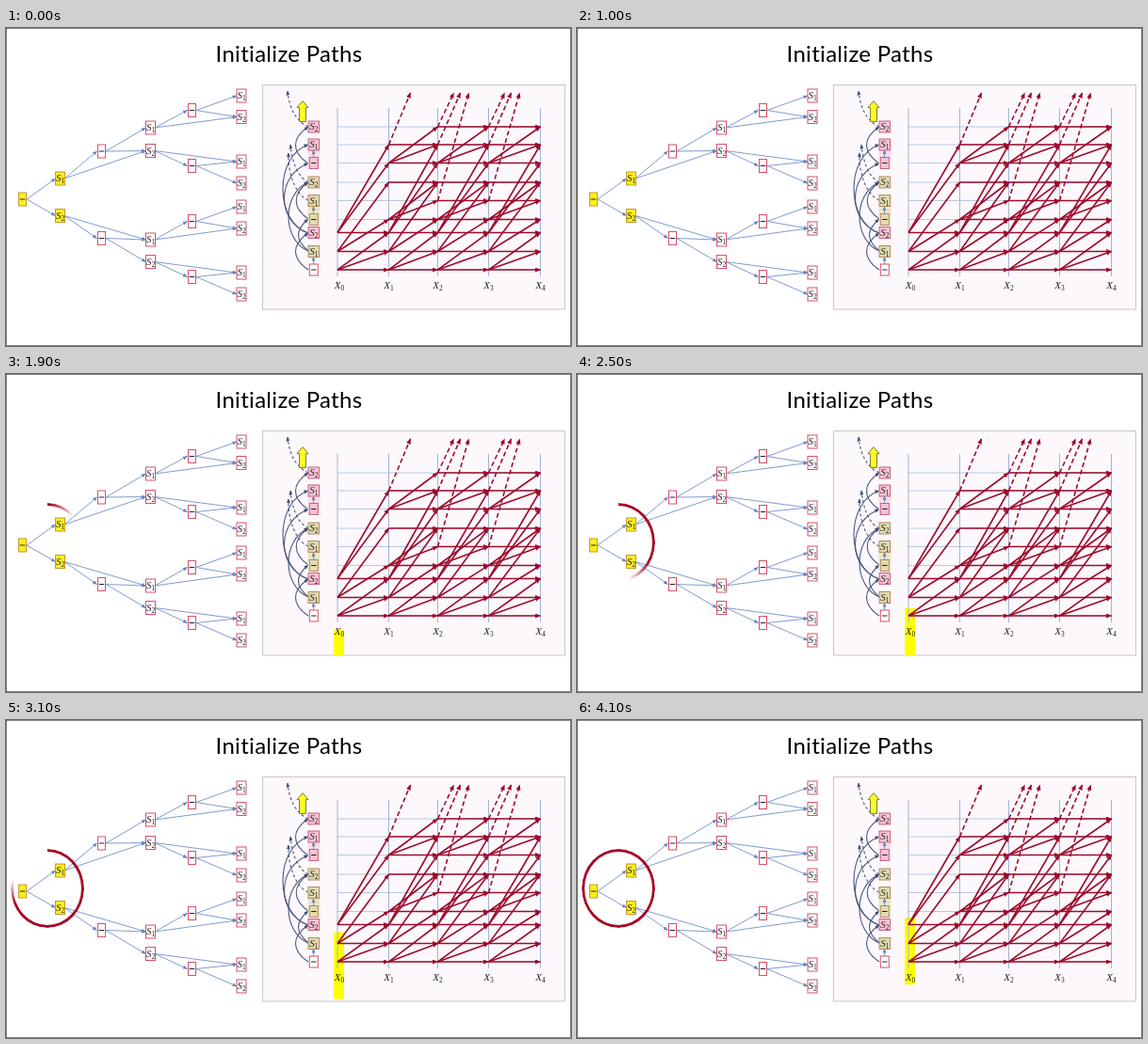
Recreate the animation shown at these times as an HTML page. Size 600 px wide and 338 px high, loop 4200 ms.

```html
<!DOCTYPE html>
<html lang="en">
<head>
<meta charset="utf-8">
<title>Initialize Paths</title>
<style>
  html, body { margin: 0; width: 100%; height: 100%; overflow: hidden; background: #fff; }
  #stage { position: relative; width: 600px; height: 338px; overflow: hidden; }
  svg { display: block; }
  .title { font: 24px Lato, sans-serif; letter-spacing: .3px; text-anchor: middle; }
  .sym { font: italic 11px "Liberation Serif", serif; text-anchor: middle; fill: #222; }
  .sub { font-size: 7.5px; font-style: normal; }
  #ring {
    position: absolute; left: 5px; top: 136.5px; width: 78px; height: 84px;
    box-sizing: border-box; border: 3px solid #a50a28; border-radius: 50%;
  }
</style>
</head>
<body>
<div id="stage">
  <svg id="art" width="600" height="338" viewBox="0 0 600 338">
    <defs>
      <marker id="blue" markerUnits="userSpaceOnUse" markerWidth="5" markerHeight="4" refX="4.5" refY="2" orient="auto">
        <path d="M0 0L5 2L0 4z" fill="#6686c2"/>
      </marker>
      <marker id="red" markerUnits="userSpaceOnUse" markerWidth="6" markerHeight="5" refX="5.5" refY="2.5" orient="auto">
        <path d="M0 0L6 2.5L0 5z" fill="#9c0c2c"/>
      </marker>
      <marker id="navy" markerUnits="userSpaceOnUse" markerWidth="5" markerHeight="4" refX="4.5" refY="2" orient="auto">
        <path d="M0 0L5 2L0 4z" fill="#3d4a70"/>
      </marker>
      <clipPath id="panelClip"><rect x="272" y="61" width="322" height="238"/></clipPath>
    </defs>
    <text class="title" x="300.5" y="36">Initialize Paths</text>
    <rect x="272.5" y="60.5" width="321" height="238.5" fill="#fcf8fc" stroke="#c9c4cd"/>
    <g clip-path="url(#panelClip)"><rect id="bar" x="348" width="11" height="71" y="300" fill="#ff0"/></g>
  </svg>
  <div id="ring"></div>
</div>
<script>
const art = document.getElementById('art');
const bar = document.getElementById('bar');
const ring = document.getElementById('ring');

function add(tag, attrs, parent = art) {
  const el = document.createElementNS('http://www.w3.org/2000/svg', tag);
  for (const k in attrs) el.setAttribute(k, attrs[k]);
  parent.appendChild(el);
  return el;
}

function path(d, stroke, width, extra = {}) {
  add('path', { d, stroke, 'stroke-width': width, fill: 'none', ...extra });
}

function arrow(x1, y1, x2, y2, kind, extra = {}) {
  const [stroke, width] = kind === 'red' ? ['#9c0c2c', 1.6] : ['#7f9bd0', 1];
  path(`M${x1} ${y1}L${x2} ${y2}`, stroke, width, { 'marker-end': `url(#${kind})`, ...extra });
}

// "S1" becomes S with a lowered digit; "-" becomes a short bar
function symbol(x, y, name) {
  if (name === '-') return path(`M${x - 2.7} ${y}h5.4`, '#222', 1);
  const t = add('text', { class: 'sym', x, y: y + 3.2 });
  t.textContent = name[0];
  const s = add('tspan', { class: 'sub', dy: 2 }, t);
  s.textContent = name[1];
}

function box(x, y, w, h, name, fill, stroke) {
  add('rect', { x: x - w / 2, y: y - h / 2, width: w, height: h, fill, stroke });
  symbol(x, y, name);
}

// Prefix tree
const nodes = [
  [17.5, 182, '-'], [57.5, 160, 'S1'], [57.5, 199.5, 'S2'],
  [101.5, 131, '-'], [101.5, 223.5, '-'],
  [153.5, 106, 'S1'], [153.5, 130.5, 'S2'], [153.5, 225, 'S1'], [153.5, 248.5, 'S2'],
  [197.5, 87.5, '-'], [197.5, 146.5, '-'], [197.5, 205.5, '-'], [197.5, 264.5, '-'],
  [250, 72, 'S1'], [250, 94.5, 'S2'], [250, 142, 'S1'], [250, 165, 'S2'],
  [250, 190, 'S1'], [250, 213, 'S2'], [250, 260, 'S1'], [250, 283, 'S2']
];
const children = [
  [1, 2], [3, 6], [4, 7], [5, 6], [7, 8], [9, 14], [10, 15], [11, 18], [12, 19],
  [13, 14], [15, 16], [17, 18], [19, 20]
];
children.forEach((list, i) => list.forEach(j => {
  const [x1, y1] = nodes[i], [x2, y2] = nodes[j];
  arrow(x1 + 4.5, y1, x2 - 5, y2, 'blue');
}));
nodes.forEach(([x, y, name], i) =>
  box(x, y, name === '-' ? 8 : 10, 14, name, i < 3 ? '#ffee1c' : '#fff', i < 3 ? '#c29a2c' : '#d5506c'));

// Trellis grid
const cols = [352, 406.5, 458.5, 512.5, 567.5];
const rows = [257, 237.5, 217.5, 203.5, 183.5, 164, 143.5, 124, 105];
rows.forEach(y => path(`M352 ${y}H567.5`, '#b9c8e4', 1));
cols.forEach(x => path(`M${x} 85V264`, '#a3b3d3', 1));

// Each state keeps itself or moves to its successors
const next = [[1, 2], [3, 5], [6, 7], [4, 5], [], [], [7, 8], [], []];
let live = new Set([0, 1, 2]);
for (let c = 0; c < 4; c++) {
  const reached = new Set(live);
  for (const s of live) {
    for (const n of [s, ...next[s]]) {
      arrow(cols[c], rows[s], cols[c + 1], rows[n], 'red');
      reached.add(n);
    }
  }
  live = reached;
}
const dashed = { 'stroke-dasharray': '5 3' };
arrow(406.5, 124, 429.5, 69, 'red', dashed);
for (const x of [458.5, 512.5]) {
  arrow(x, 105, x + 17, 69, 'red', dashed);
  arrow(x, 124, x + 24, 69, 'red', dashed);
  arrow(x, 183.5, x + 33, 69, 'red', dashed);
}
cols.forEach((x, i) => symbol(x + (i ? 0 : 2), 273.5, 'X' + i));

// State column with its curved transitions
const bend = (y1, y2, x) =>
  path(`M321 ${y1}C${x} ${y1 - 12} ${x} ${y2 + 12} 321 ${y2}`, '#4b587e', 1.1, { 'marker-end': 'url(#navy)' });
[[257, 218, 303], [237, 203, 307], [237, 164, 293], [218, 144, 287], [218, 124, 285],
 [203, 164, 304], [144, 105, 303]].forEach(b => bend(...b));
const loose = { 'stroke-dasharray': '3 2.5', 'marker-end': 'url(#navy)' };
path('M321 105C308 99 301 86 299 67', '#4b587e', 1.1, loose);
path('M321 164C309 158 304 142 302 124', '#4b587e', 1.1, loose);
path('M321 183C308 178 299 155 300 133', '#4b587e', 1.1, loose);

add('rect', { x: 320.5, y: 118, width: 13, height: 32, fill: '#fbdde8' });
add('rect', { x: 320.5, y: 177, width: 13, height: 32, fill: '#ebe6c8' });
for (const y of [143.5, 203.5, 257]) arrow(326.5, y - 6, 326.5, y - 14, 'blue');
const pink = ['#f8c3d6', '#c4657f'], tan = ['#e0dbb0', '#b58a62'];
const looks = [['#fff', '#d5506c'], tan, pink, tan, tan, tan, pink, pink, pink];
['-', 'S1', 'S2', '-', 'S1', 'S2', '-', 'S1', 'S2'].forEach((name, i) =>
  box(326.8, rows[i], name === '-' ? 9 : 11.5, 12, name, ...looks[i]));
add('path', { d: 'M315 77.5L321 84.5H318.5V99.5H311.5V84.5H309z', fill: '#ff2', stroke: '#7d7d52' });

// Thin frame around the slide
add('rect', { x: .5, y: .5, width: 599, height: 337, fill: 'none', stroke: '#333', 'stroke-width': .6 });

const LOOP = 4200, FEATHER = 40;
const clamp = v => Math.max(0, Math.min(1, v));

function draw(t) {
  bar.setAttribute('y', 300 - 90 * clamp((t - 1190) / 2310));
  const edge = clamp((t - 1680) / 2000) * (360 + FEATHER);
  ring.style.maskImage = ring.style.webkitMaskImage =
    `conic-gradient(#000 ${edge - FEATHER}deg, transparent ${edge}deg)`;
  ring.style.visibility = edge > 0 ? 'visible' : 'hidden';
}

const start = performance.now();
function tick() {
  draw((performance.now() - start) % LOOP);
  requestAnimationFrame(tick);
}
tick();
</script>
</body>
</html>
```
